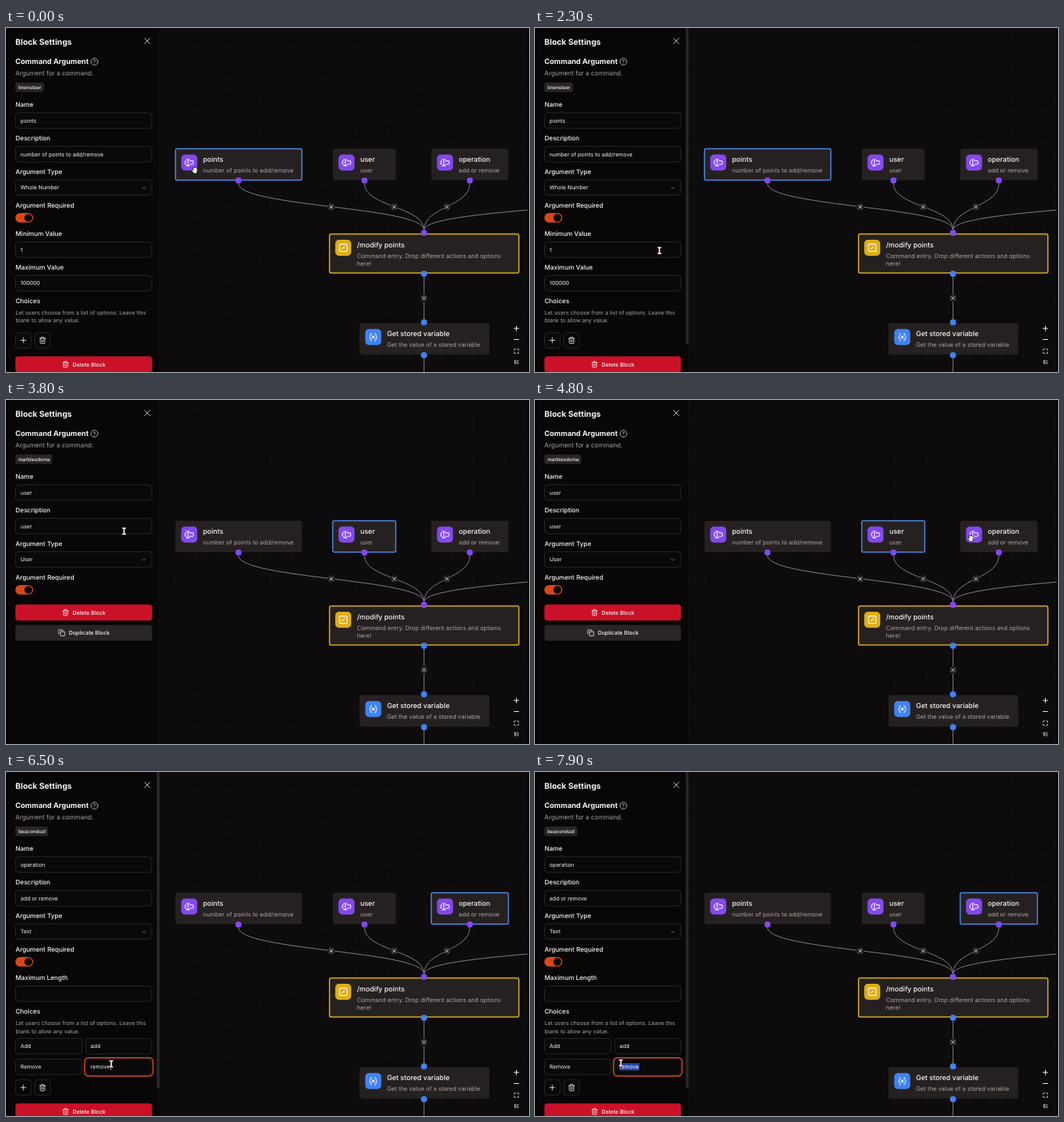
An HTML page that plays this animation: 685x450 px, repeating every 8000 ms.

```html
<!DOCTYPE html>
<html lang="en">
<head>
<meta charset="utf-8">
<title>Block editor</title>
<style>
  html, body { margin: 0; width: 100%; height: 100%; overflow: hidden; background: #0c0a0a; }
  svg { display: block; width: 685px; height: 450px; }
  text { font-family: Inter, "Liberation Sans", sans-serif; text-rendering: geometricPrecision; white-space: pre; }
</style>
</head>
<body>
<svg id="stage" viewBox="0 0 685 450"></svg>
<script>
const WHITE = '#f7f6f5', MUTED = '#a8a29e', CARD = '#262121', LINE = '#292524';
const PURPLE = '#8348ef', BLUE = '#3f83f2', YELLOW = '#ddae16', RED = '#ca1128';

const ICONS = {
  close: 'M4 4L20 20M20 4L4 20',
  plus: 'M12 4v16M4 12h16',
  minus: 'M4 12h16',
  chevron: 'M6 9l6 6 6-6',
  help: 'M22 12a10 10 0 1 1-20 0a10 10 0 1 1 20 0M9.1 9a3 3 0 0 1 5.8 1c0 2-3 3-3 3M12 17h.01',
  trash: 'M3 6h18M19 6v14a2 2 0 0 1-2 2H7a2 2 0 0 1-2-2V6M8 6V4a2 2 0 0 1 2-2h4a2 2 0 0 1 2 2v2M10 11v6M14 11v6',
  copy: 'M10 8h10a2 2 0 0 1 2 2v10a2 2 0 0 1-2 2H10a2 2 0 0 1-2-2V10a2 2 0 0 1 2-2zM4 16a2 2 0 0 1-2-2V4a2 2 0 0 1 2-2h10a2 2 0 0 1 2 2',
  input: 'M5 4h1a3 3 0 0 1 3 3 3 3 0 0 1 3-3h1M13 20h-1a3 3 0 0 1-3-3 3 3 0 0 1-3 3H5M5 16H4a2 2 0 0 1-2-2v-4a2 2 0 0 1 2-2h1M13 8h7a2 2 0 0 1 2 2v4a2 2 0 0 1-2 2h-7M9 7v10',
  slash: 'M5 3h14a2 2 0 0 1 2 2v14a2 2 0 0 1-2 2H5a2 2 0 0 1-2-2V5a2 2 0 0 1 2-2zM9 15l6-6',
  variable: 'M8 21s-4-3-4-9 4-9 4-9M16 3s4 3 4 9-4 9-4 9M15 9l-6 6M9 9l6 6',
  expand: 'M8 3H5a2 2 0 0 0-2 2v3M21 8V5a2 2 0 0 0-2-2h-3M3 16v3a2 2 0 0 0 2 2h3M16 21h3a2 2 0 0 0 2-2v-3',
  tidy: 'M3 5h7M5 5v13h5M5 12h5M14 5h7M14 12h7M14 18h7'
};

const rect = (x, y, w, h, r, fill, stroke = 'none', sw = 1) =>
  `<rect x="${x}" y="${y}" width="${w}" height="${h}" rx="${r}" fill="${fill}" stroke="${stroke}" stroke-width="${sw}"/>`;
const circle = (x, y, r, fill) => `<circle cx="${x}" cy="${y}" r="${r}" fill="${fill}"/>`;
const text = (s, x, y, size, fill = WHITE, weight = 400) =>
  `<text x="${x}" y="${y}" font-size="${size}" fill="${fill}" font-weight="${weight}">${s}</text>`;
const path = (d, stroke, sw = 1) => `<path d="${d}" fill="none" stroke="${stroke}" stroke-width="${sw}"/>`;
// Icon centred on x, y
const icon = (name, x, y, size, color = WHITE, sw = 2) =>
  `<g transform="translate(${x - size / 2} ${y - size / 2}) scale(${size / 24})" stroke-linecap="round" stroke-linejoin="round">${path(ICONS[name], color, sw)}</g>`;

// ---- Flow canvas ----
function card(x, y, w, h, color, glyph, title, lines, border = 'none') {
  return rect(x, y, w, h, 2, CARD, border, 1.5) +
    rect(x + 7.5, y + 7.5, 21, 21, 5, color) + icon(glyph, x + 18, y + 18, 13) +
    text(title, x + 36, y + 17.2, 9.05, WHITE, 500) +
    lines.map((s, i) => text(s, x + 36, y + 31 + i * 10.7, 7.8, MUTED)).join('');
}
// Edges leave and enter at the outer rim of the ports
const drop = (x1, y1, x2, y2) => {
  const m = (y1 + y2) / 2;
  return path(`M${x1} ${y1}C${x1} ${m} ${x2} ${m} ${x2} ${y2}`, '#827c90', 1);
};
const cut = (x, y) => circle(x, y, 5, '#252221') + icon('close', x, y, 6, WHITE, 3.2);

const args = [
  { x: 222, w: 165.5, port: 304.5, title: 'points', note: 'number of points to add/remove' },
  { x: 428, w: 82.5, port: 469.5, title: 'user', note: 'user' },
  { x: 557, w: 101, port: 607.5, title: 'operation', note: 'add or remove' }
];
const HUB = 547.5;

const flow = `<defs>
  <pattern id="dots" width="13.9" height="13.9" patternUnits="userSpaceOnUse" x="202" y="5">${circle(6, 6, 0.65, '#2b2726')}</pattern>
  <clipPath id="view"><rect x="202" width="481.5" height="450"/></clipPath></defs>
  <g clip-path="url(#view)">` +
  rect(202, 0, 482, 450, 0, '#0d0b0b') + rect(202, 0, 482, 450, 0, 'url(#dots)') +
  [...args.map(a => a.port), 925].map(x => drop(x, 203.5, HUB, 264)).join('') +
  drop(HUB, 325, HUB, 381) + drop(HUB, 432, HUB, 460) +
  [426, 508.5, 577.5].map(x => cut(x, 234)).join('') + cut(HUB, 353.3) +
  args.map(a => card(a.x, 158, a.w, 41, PURPLE, 'input', a.title, [a.note])).join('') +
  card(423.7, 269.5, 248, 51, YELLOW, 'slash', '/modify points',
    ['Command entry. Drop different actions and options', 'here!'], '#deb01d') +
  card(463, 386.2, 170, 41, BLUE, 'variable', 'Get stored variable', ['Get the value of a stored variable']) +
  '<g id="picked"></g>' +
  args.map(a => circle(a.port, 199.5, 4, PURPLE)).join('') + circle(HUB, 268, 4, PURPLE) +
  [321.5, 385, 428].map(y => circle(HUB, y, 4, BLUE)).join('') +
  icon('plus', 668.5, 393, 9, WHITE, 2.8) + icon('minus', 668.5, 407.5, 9, WHITE, 2.8) +
  icon('expand', 668.5, 422.7, 7.6, WHITE, 2.8) + icon('tidy', 668.5, 437.3, 7, WHITE, 2.4) + '</g>';

// ---- Settings panel ----
const label = (s, y) => text(s, 12.5, y + 3.1, 8.32, WHITE, 500);
const field = (s, y, x = 12.5, w = 178.5) =>
  rect(x, y - 10.2, w, 20.4, 4, '#0a0808', LINE) + text(s, x + 6.5, y + 2.6, 7.16);
const square = (glyph, x, y) => rect(x, y - 10.2, 20.4, 20.4, 4, '#0a0808', LINE) + icon(glyph, x + 10.2, y, 10);
const button = (s, glyph, y, fill, x) =>
  rect(12.3, y - 10.4, 179, 20.8, 4, fill) + icon(glyph, x, y, 9.5) + text(s, x + 9.3, y + 2.6, 7.2, WHITE, 500);
const choices = (y) => label('Choices', y) +
  text('Let users choose from a list of options. Leave this', 12.5, y + 18.2, 7.29, MUTED) +
  text('blank to allow any value.', 12.5, y + 28.6, 7.29, MUTED);
const tools = (y) => square('plus', 12.5, y) + square('trash', 37.7, y);
const remove = (y) => button('Delete Block', 'trash', y, RED, 78);

const base = (tag, tagWidth, name, note, type) =>
  rect(12.3, 71.3, tagWidth, 12.4, 2, LINE) + text(tag, 16.2, 79.8, 6.35, WHITE, 500) +
  field(name, 121) + field(note, 165) + field(type, 208.6) + icon('chevron', 180.5, 209, 8, MUTED);

const panels = [
  { rows: [121, 165, 290, 334],
    body: base('linensteer', 37.5, 'points', args[0].note, 'Whole Number') +
      label('Minimum Value', 269) + field('1', 290) + label('Maximum Value', 313) + field('100000', 333.8) +
      choices(356.5) + tools(408.5) + remove(440) },
  { rows: [121, 165],
    body: base('marblesdome', 48, 'user', 'user', 'User') +
      remove(278) + button('Duplicate Block', 'copy', 304.6, LINE, 73) },
  { rows: [121, 165, 290, 359, 386],
    body: base('beacondust', 43, 'operation', args[2].note, 'Text') +
      label('Maximum Length', 269) + field('', 290) + choices(313) +
      field('Add', 358.8, 12.5, 87) + field('add', 358.8, 104.3, 86.7) +
      field('Remove', 385.7, 12.5, 87) + field('', 385.7, 104.3, 86.7) +
      '<g id="edit"></g>' + text('remove', 110.8, 388.3, 7.16) + tools(412.8) + remove(444) }
];

const frame = rect(0, 0, 202, 450, 0, '#080606') + rect(201, 0, 1, 450, 0, '#141211') +
  text('Block Settings', 12.3, 21.8, 10.55, WHITE, 650) + icon('close', 185, 17, 10.5, '#c4c0bd', 2.2) +
  text('Command Argument', 12.3, 46.8, 9.48, WHITE, 650) + icon('help', 115.8, 44, 10.8, '#b8b4b1', 2) +
  text('Argument for a command.', 12.3, 61.7, 8.3, MUTED) +
  label('Name', 100) + label('Description', 144) + label('Argument Type', 187.6) + label('Argument Required', 231.5) +
  rect(12.3, 242, 23.3, 12.6, 6.3, '#dc4519') + circle(29.2, 248.3, 5.1, '#0b0808');

const hand = `<path d="M-3.4 -.2C-3 -1.3 -2-.8-1.4 0V-3.2C-1.4-4.3 0-4.3 .1-3.2C.3-4.1 1.6-4 1.7-2.9C2-3.6 3-3.4 3.1-2.4C3.7-2.8 4.3-2.3 4.2-1.5L3.8 2C3.5 3.6 2.6 4.3 1 4.3C-1.2 4.3-1.7 2.9-3.4-.2Z" fill="#fff" stroke="#111" stroke-width=".8"/>`;
const beam = 'M-2.4-4Q-.2-4 0-3Q.2-4 2.4-4M0-3V3M-2.4 4Q-.2 4 0 3Q.2 4 2.4 4';
const cursors = {
  hand,
  beam: path(beam, '#3d1015', 3.2) + path(beam, '#fff', 1.5),
  dot: circle(0, 0, 4, '#64222b') + circle(0, 0, 2.5, '#fff')
};

const stage = document.getElementById('stage');
stage.innerHTML = flow + frame +
  panels.map(p => `<g class="panel">${p.body}</g>`).join('') +
  `<g id="bar">${rect(197.5, -4, 3.4, 418.5, 1.7, '#2b2827')}</g>` +
  rect(0, 0, 1.5, 450, 0, '#000') + rect(683.5, 0, 1.5, 450, 0, '#000') +
  Object.entries(cursors).map(([k, s]) => `<g class="cursor" data-kind="${k}">${s}</g>`).join('');

const $ = id => document.getElementById(id);
const panelEls = stage.querySelectorAll('.panel'), cursorEls = stage.querySelectorAll('.cursor');
const show = (el, on) => el.setAttribute('visibility', on ? 'visible' : 'hidden');

// ---- Timeline: time, x, y ----
const track = [
  [0, 246.5, 186], [100, 246.5, 186], [900, 185, 225], [1000, 185, 225], [1100, 186.5, 215.5],
  [1600, 170, 330], [1800, 170, 330], [2300, 163, 291], [2400, 163, 291], [3000, 453.5, 185],
  [3400, 453.5, 185], [3900, 120, 170], [4200, 110, 210], [4300, 110, 210], [4800, 570, 181],
  [5200, 572, 181], [5800, 163, 353], [6000, 138, 382], [7100, 137.5, 381.5], [7900, 112.5, 380.5], [8000, 112.5, 380.5]
];
function pointer(t) {
  const i = track.findIndex(k => k[0] > t), a = track[i - 1], b = track[i];
  const u = (t - a[0]) / (b[0] - a[0]), e = u * u * (3 - 2 * u);
  return [a[1] + (b[1] - a[1]) * e, a[2] + (b[2] - a[2]) * e];
}

function draw(t) {
  const [x, y] = pointer(t);
  const panel = t < 3300 ? 0 : t < 5200 ? 1 : 2;
  const chosen = args[t < 3100 ? 0 : t < 5000 ? 1 : 2];
  panelEls.forEach((el, i) => show(el, i === panel));
  $('picked').innerHTML = rect(chosen.x, 158, chosen.w, 41, 2, 'none', '#4a86e8', 1.5);
  show($('bar'), (t >= 800 && t < 2800) || t >= 5900);

  let edit = '';
  if (t >= 6100) {
    edit = rect(102.8, 373.8, 89.8, 24, 5, 'none', '#d9482a', 1.4);
    const letters = Math.round(Math.min(1, Math.max(0, (137.5 - x) / 25)) * 6);
    edit += letters ? rect(136.6 - letters * 4.3, 381, letters * 4.3, 9.4, 0, '#2449a6')
                    : rect(136.8, 381.5, 0.7, 8.5, 0, WHITE);
  }
  $('edit').innerHTML = edit;

  const typing = panels[panel].rows.some(r => Math.abs(r - y) < 10);
  const kind = x > 202 ? 'hand' : typing ? 'beam' : 'dot';
  cursorEls.forEach(el => {
    show(el, el.dataset.kind === kind);
    el.setAttribute('transform', `translate(${x} ${y})`);
  });
}

// The screen refreshes ten times a second
function tick() {
  draw(Math.floor(performance.now() % 8000 / 100) * 100);
  requestAnimationFrame(tick);
}
tick();
</script>
</body>
</html>
```
